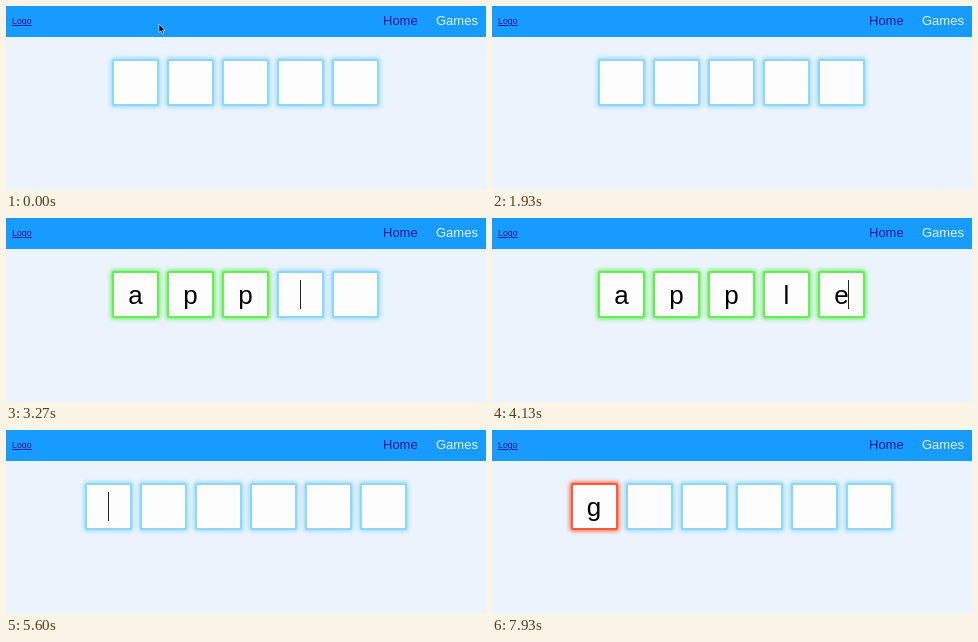
An HTML page that plays this animation: 480 px wide and 184 px high, repeating every 8000 ms.

```html
<!DOCTYPE html>
<html lang="en">
<head>
<meta charset="utf-8">
<style>
  html, body { margin: 0; width: 100%; height: 100%; overflow: hidden; background: #ebf3fd; }
  body { position: relative; font-family: "Liberation Sans", Arial, sans-serif; }
  nav { position: absolute; inset: 0 0 auto; height: 31px; background: #179bff; color: #35158f; }
  nav span { position: absolute; top: 0; line-height: 30px; font-size: 13px; }
  nav .logo { left: 6px; font-size: 8.8px; text-decoration: underline; }
  .box {
    position: absolute; top: 53px; width: 47px; height: 47px; box-sizing: border-box;
    border: 2px solid var(--edge); border-radius: 2px; background: #fdfdfd;
    box-shadow: 0 0 4px 1px var(--edge);
    font-size: 26px; line-height: 45px; text-align: center; color: #000;
  }
  #caret { position: absolute; top: 62px; width: 1px; height: 29px; background: #222; }
  #pointer { position: absolute; left: 0; top: 0; overflow: visible; }
</style>
</head>
<body>
<nav>
  <span class="logo">Logo</span>
  <span style="left:377px">Home</span>
  <span style="left:430px;color:#e4f2ff">Games</span>
</nav>
<div id="boxes"></div>
<div id="caret"></div>
<svg id="pointer" width="10" height="14">
  <path id="arrow" d="M0 0V8.5L2 6.7L3.4 9.8L4.8 9.2L3.4 6.2H6Z" fill="#000" stroke="#fff" stroke-width=".6"/>
  <path id="beam" d="M-2 -5Q0 -5 0 -4Q0 -5 2 -5M0 -4V4M-2 5Q0 5 0 4Q0 5 2 5" fill="none" stroke="#333"/>
</svg>
<script>
const LOOP = 8000, BLINK = 535, PITCH = 55, MIDDLE = 239.5, SIZE = 47;
const BLUE = '#8fd8f5', GREEN = '#66ee55', RED = '#ff5a36';

// Each step restarts the caret blink; focus -1 means no caret.
const steps = [
  { at: 0,    count: 5, text: '',      edge: GREEN, focus: -1 },
  { at: 930,  count: 5, text: '',      edge: GREEN, focus: 0 },
  { at: 2470, count: 5, text: 'a',     edge: GREEN, focus: 1 },
  { at: 2870, count: 5, text: 'ap',    edge: GREEN, focus: 2 },
  { at: 3270, count: 5, text: 'app',   edge: GREEN, focus: 3 },
  { at: 3670, count: 5, text: 'appl',  edge: GREEN, focus: 4 },
  { at: 4000, count: 5, text: 'apple', edge: GREEN, focus: 4 },
  { at: 4530, count: 6, text: '',      edge: RED,   focus: 0 },
  { at: 6070, count: 6, text: 'g',     edge: RED,   focus: 0 }
];

const byId = id => document.getElementById(id);
const show = (element, visible) => { element.style.visibility = visible ? 'visible' : 'hidden'; };
const center = (index, count) => MIDDLE + (index - (count - 1) / 2) * PITCH;

const boxes = Array.from({ length: 6 }, () => {
  const box = document.createElement('div');
  box.className = 'box';
  byId('boxes').append(box);
  return box;
});

function drawBoxes({ count, text, edge }) {
  boxes.forEach((box, i) => {
    show(box, i < count);
    box.style.left = center(i, count) - SIZE / 2 + 'px';
    box.style.setProperty('--edge', text[i] ? edge : BLUE);
    box.textContent = text[i] || '';
  });
}

function drawCaret({ at, count, text, focus }, time) {
  const caret = byId('caret');
  show(caret, focus >= 0 && Math.floor((time - at) / BLINK) % 2 === 0);
  caret.style.left = Math.floor(center(focus, count) + (text[focus] ? 7 : 0)) + 'px';
}

function drawPointer(time) {
  const p = Math.min(1, Math.max(0, (time - 70) / 600));
  const ease = p * p * (3 - 2 * p);
  const x = 153 - 13 * ease, y = 18 + 62 * ease;
  const visible = time < 870, overBox = y > 53;
  byId('pointer').style.transform = `translate(${x}px, ${y}px)`;
  show(byId('arrow'), visible && !overBox);
  show(byId('beam'), visible && overBox);
}

let current;
function frame() {
  const time = performance.now() % LOOP;
  const step = steps.findLast(s => s.at <= time);
  if (step !== current) drawBoxes(current = step);
  drawCaret(step, time);
  drawPointer(time);
  requestAnimationFrame(frame);
}
frame();
</script>
</body>
</html>
```
